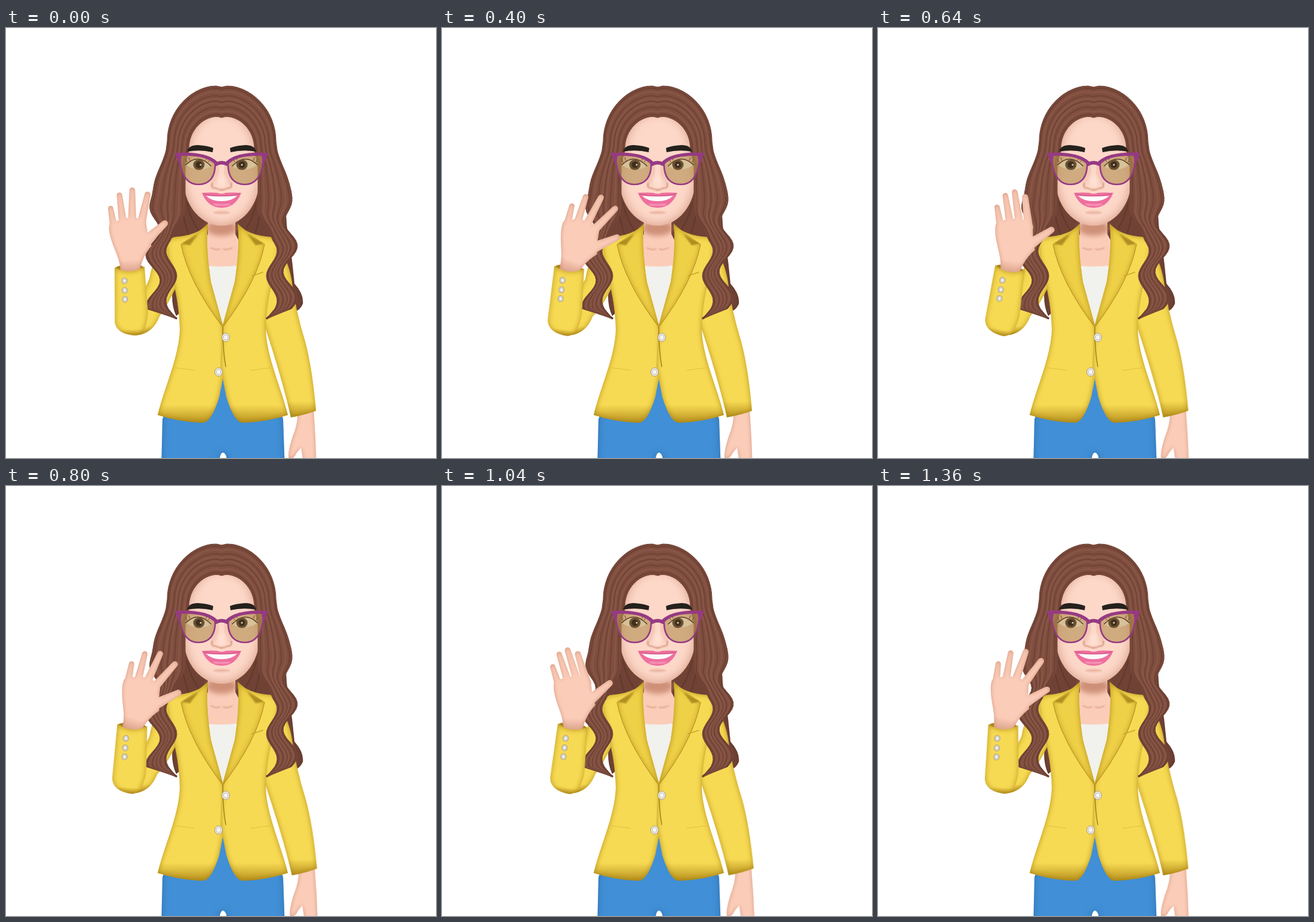
Recreate the animation shown at these times as an HTML page. Size 720 px wide and 720 px high, loop 1.44 s.

```html
<!DOCTYPE html>
<html lang="en">
<head>
<meta charset="utf-8">
<title>Waving woman</title>
<style>
html, body { margin: 0; width: 100%; height: 100%; overflow: hidden; background: #fff; }
svg { display: block; width: 100%; height: 100%; }
</style>
</head>
<body>
<svg id="stage" viewBox="0 0 720 720"></svg>
<script>
const TAU = 2 * Math.PI, CENTER = 361;
const yellow = 'url(#cloth)', skin = '#fbcdb9', purple = '#963a83';

const ease = x => { x = Math.min(1, Math.max(0, x)); return x * x * (3 - 2 * x); };
const shape = (d, fill, extra = '') => `<path d="${d}" fill="${fill}" ${extra}/>`;
const line = (d, color, width, extra = '') =>
  `<path d="${d}" fill="none" stroke="${color}" stroke-width="${width}" stroke-linecap="round" ${extra}/>`;
const oval = (x, y, rx, ry, fill, extra = '') =>
  `<ellipse cx="${x}" cy="${y}" rx="${rx}" ry="${ry}" fill="${fill}" ${extra}/>`;
const group = (attrs, ...parts) => `<g ${attrs}>${parts.join('')}</g>`;
const mirrored = (content, axis = CENTER) =>
  content + group(`transform="translate(${2 * axis} 0) scale(-1 1)"`, content);
const button = (x, y, r) =>
  oval(x, y, r, r * 1.1, '#eceae6', 'stroke="#a99a72"') + oval(x, y, r * .58, r * .62, '#f7f6f4', 'stroke="#bdbab5"');

// Filter that darkens a shape towards its edge
const shade = (id, color, blur, opacity) => `
  <filter id="${id}" color-interpolation-filters="sRGB">
    <feFlood flood-color="${color}" flood-opacity="${opacity}"/>
    <feComposite operator="out" in2="SourceAlpha"/>
    <feGaussianBlur stdDeviation="${blur}"/>
    <feComposite operator="in" in2="SourceAlpha" result="edge"/>
    <feMerge><feMergeNode in="SourceGraphic"/><feMergeNode in="edge"/></feMerge>
  </filter>`;
const blur = (id, amount) =>
  `<filter id="${id}" x="-50%" y="-50%" width="200%" height="200%"><feGaussianBlur stdDeviation="${amount}"/></filter>`;
const fade = (id, from, to, where) => `<linearGradient id="${id}" x2="0" y2="1">
  <stop offset="${where}" stop-color="${from}"/><stop offset="1" stop-color="${to}"/></linearGradient>`;

const defs = `<defs>
  ${shade('hairShade', '#4a281f', 3, .5)}
  ${shade('faceShade', '#cf8d73', 9, .9)}
  ${shade('handShade', '#c98268', 3.5, .75)}
  ${shade('clothShade', '#a07808', 5, .75)}
  ${shade('denimShade', '#2a68a6', 6, .8)}
  ${blur('soft', 4)}${blur('fine', 1.3)}
  ${fade('cloth', '#f7da53', '#b8921f', .91)}
  ${fade('palm', skin, '#d3957c', .72)}
</defs>`;

// One flowing line of hair; depth 0 is the outer edge, 1 the edge along the face
function hairLine(side, depth, peak) {
  const pts = [];
  const add = (outer, inner) => {
    const [dx, y] = outer.map((v, i) => v + (inner[i] - v) * depth);
    pts.push(`${(CENTER + side * dx).toFixed(1)},${(y + 4 * Math.exp(-dx / 10)).toFixed(1)}`);
  };
  for (let u = 0; u <= 1; u += 1 / 16) {
    const sin = Math.sin(u * TAU / 4), cos = Math.cos(u * TAU / 4);
    add([91 * sin, 190 - 95 * cos], [55 * sin, 202 - 56 * cos]);
  }
  for (let y = 206; y < 474; y += 6) {
    const outer = 91 + 24 * ease((y - 190) / 85) + 12 * ease((y - 250) / 100) * Math.cos(TAU * (y - peak) / 86);
    const inner = 55 + 6 * ease((y - 202) / 30) + 23 * ease((y - 305) / 45) +
      9 * ease((y - 330) / 40) * Math.cos(TAU * (y - 373) / 84);
    add([outer, y], [inner, y]);
  }
  add([76, 486], [76, 486]);
  return pts;
}
function lock(side, peak) {
  let strands = '';
  for (let i = 1; i < 10; i++) {
    const d = 'M' + hairLine(side, i / 10 + .025 * Math.sin(i * 5), peak).join('L');
    strands += i % 2 ? line(d, '#5b3429', 1.8, 'opacity=".45"') : line(d, '#8f5c4c', 3.2, 'opacity=".5"');
  }
  const edge = [...hairLine(side, 0, peak), ...hairLine(side, 1, peak).reverse()];
  return shape(`M${edge.join('L')}Z`, '#7f4e3f', 'stroke="#7f4e3f"') + strands;
}
const frontHair = group('filter="url(#hairShade)"', lock(-1, 380), lock(1, 365));

const backHair = group('filter="url(#hairShade)"',
  shape(`M361,120C260,130 255,240 265,330L288,400Q270,450 285,482L300,470L310,365H420L440,420L470,470
    Q488,482 497,462Q499,446 483,428L479,390L470,330C465,240 460,130 361,120Z`, '#6f4235'),
  mirrored(line('M303,292Q308,320 326,345M293,292Q298,325 307,350', '#54301f', 2, 'opacity=".5"')));

const trousers = shape(`M300,560H430L464,655L467,740H371Q371,711 363,711Q357,711 356,740H260L262,655Z`,
  '#418fd6', 'filter="url(#denimShade)"');

const neck = group('',
  shape('M338,310V345L325,370L332,410H390L397,370L384,345V310Z', skin),
  oval(CENTER, 335, 26, 13, '#c07c62', 'filter="url(#soft)" opacity=".75"'),
  mirrored(line('M343,368Q352,373 358,370', '#e0a48d', 2, 'filter="url(#fine)"')),
  shape('M332,397Q361,402 390,397L364,508Z', '#f1f1ed'));

const hangingArm = group('id="hanging"',
  shape('M488,638Q490,660 480,684Q470,715 474,722Q482,722 487,711L494,703L500,740H520Q519,690 515,638Z',
    skin, 'filter="url(#handShade)"'),
  shape('M430,352Q466,360 478,420Q484,470 501,525Q513,570 519,641Q500,648 477,652Q462,585 430,490Z',
    yellow, 'filter="url(#clothShade)"'));

const lapelEdge = 'M293,362Q305,425 364,502';
const jacket = group('',
  mirrored(group('filter="url(#clothShade)"',
    shape(`M338,328Q322,347 282,350L268,356C270,400 290,440 291,505C290,550 264,605 254,648Q290,660 330,661
      Q344,660 357,618L367,567L364,500L343,425Q334,365 338,328Z`, yellow)) +
    shape(`${lapelEdge}L343,425Q334,365 338,328L320,343Z`, '#eecf45', 'filter="url(#clothShade)" opacity=".8"') +
    shape('M294,361L322,345L308,364Z', '#8a690d', 'opacity=".6" filter="url(#fine)"') +
    line(lapelEdge, '#a8841a', 1.1, 'opacity=".8"') +
    line('M284,569L316,573', '#c9a629', 1.2, 'opacity=".5"'), 363),
  line('M363,501Q363,540 368,567', '#a07c18', 1.4),
  line('M412,415L430,409', '#c9a629', 1.5),
  button(368, 518, 6.5), button(356, 576, 6.5));

const face = group('',
  shape('M361,140C320,140 306,180 304,205L297,250C297,300 329,331 361,331S424,300 425,250L418,205C416,180 402,140 361,140Z',
    '#fdd8c9', 'filter="url(#faceShade)"'),
  mirrored(line('M353,230Q352,250 346,260', '#e0a48c', 4, 'filter="url(#soft)"') +
    line('M345,260Q343,269 351,268Q356,271 361,271', '#cd8b72', 2, 'filter="url(#fine)"')),
  oval(CENTER, 256, 7, 9, '#ffe3d7', 'filter="url(#soft)"'),
  oval(CENTER, 309, 14, 2.5, '#d8977f', 'filter="url(#fine)" opacity=".5"'));

const mouth = group('',
  shape('M328,276Q345,275 354,276Q361,279 368,276Q377,275 394,276Q384,301 361,301T328,276Z', '#ee6f9e'),
  shape('M335,281Q361,283 387,281Q378,290 361,290T335,281Z', '#fdfcfb'),
  line('M331,278Q361,285 391,278', '#c9557e', 1.2),
  line('M348,295Q361,298 374,295', '#f99dbd', 2.5, 'filter="url(#fine)"'));

const eye = shape('M302,230Q322,209 343,232Q322,243 302,230Z', '#d6c199') +
  line('M301,229Q322,209 343,231', '#5a3d27', 1.6) +
  line('M303,225L301,220M308,222L306,217M335,221L337,217M339,224L342,220', '#6b4a32', 1);
const iris = (x, glint) => oval(x, 229, 9.5, 8.8, '#6b5233') + oval(x, 229, 5.5, 5.5, '#412f1d') +
  oval(glint, 229, 1.6, 1.6, '#e0cfae');
const lens = 'M291,213Q330,208 350,223C352,250 340,262 322,262C300,262 291,240 291,213Z';
const glasses = group('',
  mirrored(shape(lens, '#b59053', 'opacity=".62"') + eye), iris(323, 326), iris(395, 395),
  mirrored(line(lens, purple, 2.6) +
    shape('M283,209Q335,206 354,224L350,229Q338,213 294,214L291,231Z', purple)),
  line('M352,228Q361,223 370,228', purple, 6));

const brows = mirrored(shape('M303,207Q306,196 321,196Q338,197 347,201L346,208Q325,203 303,207Z', '#24211c'));

// A tapered finger that starts at x, y and points along the angle
const finger = (x, y, angle, length, wide, thin) => shape(
  `M${-wide},6L${-thin},${thin - length}A${thin},${thin} 0 0 1 ${thin},${thin - length}L${wide},6Z`,
  skin, `transform="translate(${x} ${y}) rotate(${angle})"`);

function hand(bend) {
  let fingers = finger(25, -42, 48, 52, 10, 5.2);
  for (let i = 0; i < 4; i++) {
    fingers += finger(15.5 * i - 26, 2 * (i - 2) ** 2 - 77, 2 * i * i - 11 + bend * (6 + 1.3 * i * i),
      57 - 5 * (i - 2.1) ** 2, 6.6 + .3 * i, 4.4 + .2 * i);
  }
  return fingers + shape(`M-15,14Q-14,-4 -22,-24Q-37,-60 -33,-72Q0,-92 28,-77L31,-55L37,-36Q18,-14 16,14Z`, 'url(#palm)');
}

const upperArm = ({ x, y }) => shape(`M282,350Q250,365 240,420L${x},${y}Q${x - 4},${y + 27} ${x + 14},${y + 27}
  Q${x + 38},${y + 22} ${x + 48},${y - 4}Q270,465 284,435L292,390Z`, yellow, 'filter="url(#clothShade)"');

function forearm({ x, y, lean, turn, bend }) {
  const reach = 86, angle = lean * TAU / 360;
  const wrist = [x + reach * Math.sin(angle), y - reach * Math.cos(angle)];
  const sleeve = `transform="translate(${x} ${y}) rotate(${lean})"`;
  return group(sleeve, oval(0, -85, 24, 6, '#a9841a')) +
    group('filter="url(#handShade)"', group(`transform="translate(${wrist}) rotate(${turn})"`, hand(bend))) +
    group(sleeve,
      shape('M-25,-87Q0,-72 25,-87L29,-10Q26,26 8,28Q-24,26 -27,5Z', yellow, 'filter="url(#clothShade)"'),
      ...[-64, -48, -33].map(by => button(-9, by, 4.6)));
}

// Three waves per loop, the first slower than the last; the hand trails the arm
const STEP = 80, STEPS = 18, WAVE = STEPS / 3;
function poseAt(step) {
  const phase = step - .8 * Math.sin(TAU * (step + 1.5) / STEPS);
  const swing = peak => Math.cos(TAU * (phase - peak) / WAVE);
  return {
    x: 207 - 4 * swing(3.6),
    y: 487,
    lean: 5 + 7 * swing(3),
    turn: 7.5 + 16 * swing(3.6),
    bend: 1.3 * swing(4.5) - .2
  };
}

const stage = document.getElementById('stage');
stage.innerHTML = defs + backHair + trousers + neck + hangingArm + '<g id="upper"></g>' + jacket + face +
  mouth + frontHair + brows + glasses + '<g id="fore"></g>';
const [hanging, upper, fore] = ['hanging', 'upper', 'fore'].map(id => document.getElementById(id));

const start = performance.now();
let shown = -1;
function draw() {
  const step = Math.floor((performance.now() - start) / STEP) % STEPS;
  if (step !== shown) {
    shown = step;
    const pose = poseAt(step);
    upper.innerHTML = upperArm(pose);
    fore.innerHTML = forearm(pose);
    const drift = .6 * Math.exp(-(((step - 12.5) / 3.5) ** 2));
    hanging.setAttribute('transform', `rotate(${-drift} 455 370)`);
  }
  requestAnimationFrame(draw);
}
draw();
</script>
</body>
</html>
```
